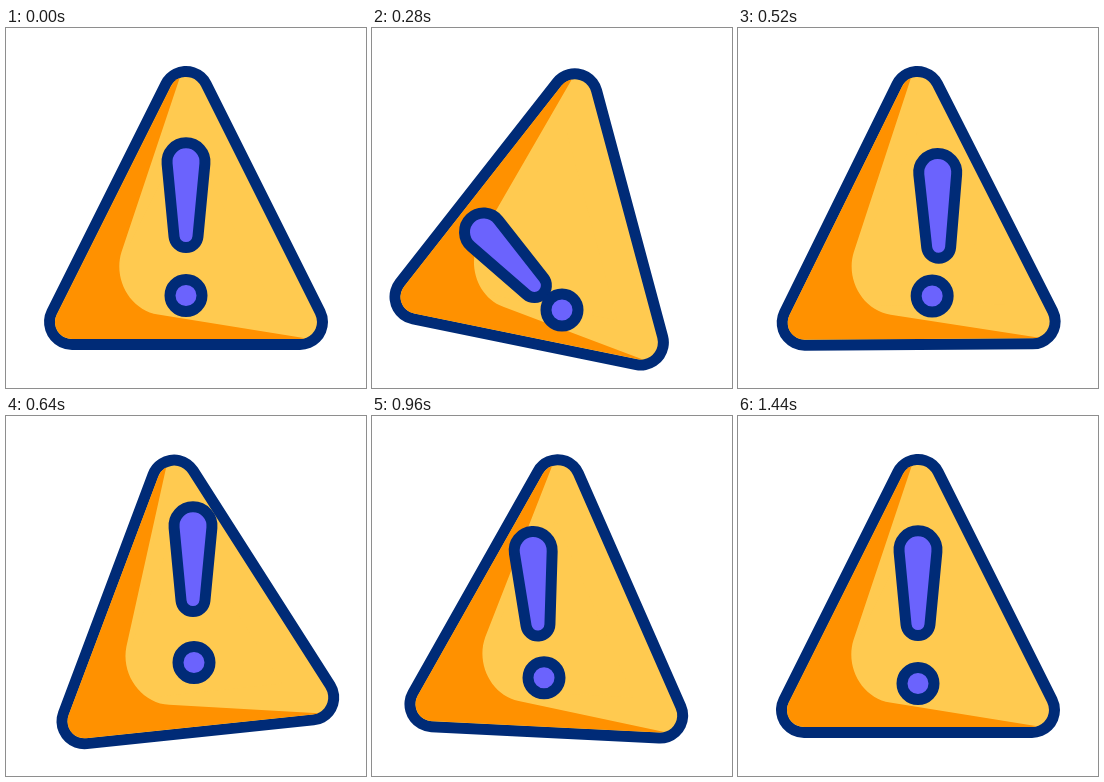
Write an HTML page that moves like this. It is 360 by 360 pixels and loops after 2000 ms.

```html
<!DOCTYPE html>
<html lang="en">
<head>
<meta charset="utf-8">
<title>Warning sign</title>
<style>
  html, body { margin: 0; width: 100%; height: 100%; overflow: hidden; background: #fff; }
  svg { display: block; width: 100vw; height: 100vh; }
  .ink { stroke: #002b77; stroke-width: 11; fill: #6b63fd; }
  .round { stroke-linejoin: round; }
</style>
</head>
<body>
<svg viewBox="0 0 360 360">
  <defs>
    <path id="tri" d="M180 66L66 294H294Z"/>
    <clipPath id="inside">
      <path d="M164.8 58.4A17 17 0 0 1 195.2 58.4L309.2 286.4A17 17 0 0 1 294 311H66A17 17 0 0 1 50.8 286.4Z"/>
    </clipPath>
  </defs>
  <g id="sign">
    <use href="#tri" class="round" stroke="#002b77" stroke-width="56"/>
    <use href="#tri" class="round" fill="#ffca50" stroke="#ffca50" stroke-width="34"/>
    <path clip-path="url(#inside)" fill="#ff9100" d="M175 46L115.5 224C107 251 124 282 152 286.5L304 311V330H20V46Z"/>
  </g>
  <path id="bar" class="ink" d="M-18.9 -35A19 19 0 1 1 18.9 -35L11.95 37.9A12 12 0 0 1 -11.95 37.9Z"/>
  <circle id="dot" class="ink" r="16"/>
</svg>
<script>
const LOOP = 2000, STEP = 40, SETTLED = 1440;
const RISE = 340, SWING = 290, TILT = 12;
const [sign, bar, dot] = ['sign', 'bar', 'dot'].map(id => document.getElementById(id));

// Offsets from rest where the mark bounces: bar x, bar y, bar angle, dot x, dot y.
const rest = [0, 0, 0, 0, 0];
const poses = [
  { t: 0, at: rest },
  { t: 280, at: [-43, 60, -43.6, 10, 14.5] },
  { t: 440, at: [24, 38, -2, 16, 13] },
  { t: 640, at: [7, -24, 0, 8, -21] },
  { t: 800, at: [-20, -18, -7.4, -3, -14.5] },
  { t: 1160, at: [-8.5, 20, 1.5, -11, 1.5] },
  { t: SETTLED, at: rest }
];

// Swings side to side; each swing is half as wide as the one before.
function signAngle(t) {
  if (t < RISE) return TILT * Math.sin(t / RISE * Math.PI / 2);
  const swing = (t - RISE) / SWING, n = Math.floor(swing);
  if (n > 2) return 0;
  const from = TILT * (-0.5) ** n, to = n < 2 ? -from / 2 : 0;
  return (from + to + (from - to) * Math.cos((swing - n) * Math.PI)) / 2;
}

// Monotone cubic through the poses: velocity is zero at every turning point.
function markPose(t) {
  if (t >= SETTLED) return rest;
  const i = poses.findIndex(p => p.t > t) - 1;
  const a = poses[i], b = poses[i + 1], span = b.t - a.t, u = (t - a.t) / span;
  const slope = (k, c) => k < 0 || k > poses.length - 2 ? 0
    : (poses[k + 1].at[c] - poses[k].at[c]) / (poses[k + 1].t - poses[k].t);
  const velocity = (k, c) => {
    const before = slope(k - 1, c), after = slope(k, c);
    return before * after > 0 ? 2 * before * after / (before + after) : 0;
  };
  return a.at.map((v, c) => v + (b.at[c] - v) * u * u * (3 - 2 * u)
    + span * u * (1 - u) * (velocity(i, c) * (1 - u) - velocity(i + 1, c) * u));
}

function draw(now) {
  const t = Math.floor(now % LOOP / STEP) * STEP;
  const [barX, barY, barAngle, dotX, dotY] = markPose(t);
  sign.setAttribute('transform', `rotate(${signAngle(t)} 180 180)`);
  bar.setAttribute('transform', `translate(${180 + barX} ${170.8 + barY}) rotate(${barAngle})`);
  dot.setAttribute('transform', `translate(${180 + dotX} ${267.5 + dotY})`);
}

let start;
function frame(now) {
  start ??= now;
  draw(now - start);
  requestAnimationFrame(frame);
}
draw(0);
requestAnimationFrame(frame);
</script>
</body>
</html>
```
